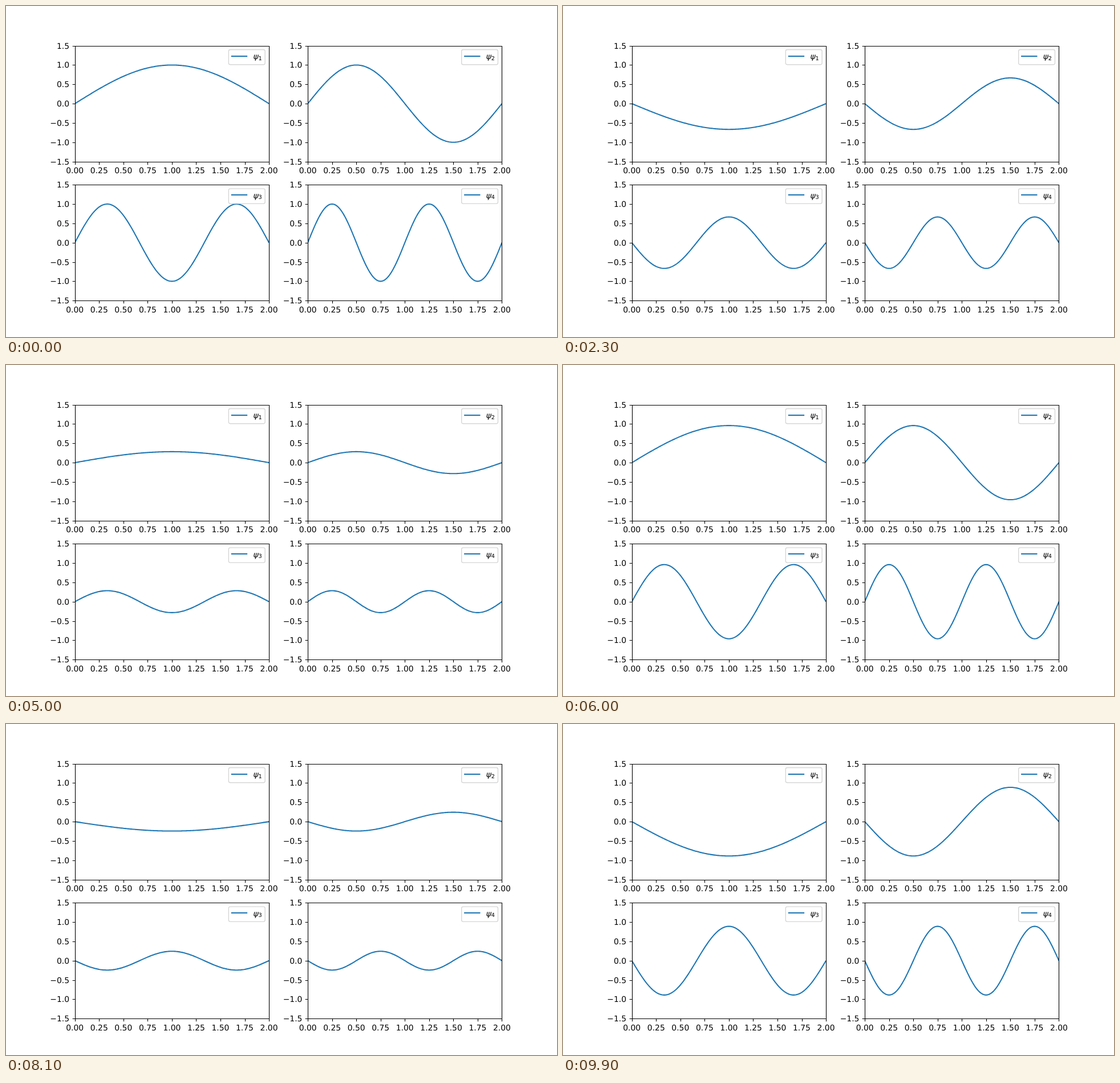
An HTML page that plays this animation: 966 by 580 pixels, repeating every 10000 ms.

```html
<!DOCTYPE html>
<html lang="en">
<head>
<meta charset="utf-8">
<title>Standing waves</title>
<style>
  html, body { margin: 0; width: 100%; height: 100%; overflow: hidden; background: #fff; }
  svg { display: block; }
  text { font: 13.89px "DejaVu Sans", sans-serif; text-rendering: geometricPrecision; }
  .mid { text-anchor: middle; }
  .end { text-anchor: end; }
  .psi { font-style: italic; }
  .sub { font-size: 9.72px; }
  .axis { fill: none; stroke: #000; stroke-width: 1.11; }
  .wave { fill: none; stroke: #1f77b4; stroke-width: 2.083; stroke-linejoin: round; }
  .box { fill: #fff; fill-opacity: .8; stroke: #ccc; stroke-opacity: .8; stroke-width: 1.39; }
</style>
</head>
<body>
<svg id="stage" width="966" height="580" viewBox="0 0 966 580"></svg>
<script>
const NS = "http://www.w3.org/2000/svg";
const stage = document.getElementById("stage");
const W = 340.295, H = 203;
const STEP = 100, STEPS = 100, POINTS = 200;
const snap = v => Math.round(v) + 0.5;

function add(parent, tag, attrs, text) {
  const el = document.createElementNS(NS, tag);
  for (const key in attrs) el.setAttribute(key, attrs[key]);
  if (text !== undefined) el.textContent = text;
  parent.appendChild(el);
  return el;
}

function makePanel(n) {
  const left = 120.75 + (n % 2 ? 0 : 408.35);
  const top = 69.6 + (n > 2 ? 243.6 : 0);
  const right = left + W, bottom = top + H;
  const x0 = snap(left), y0 = snap(top), x1 = snap(right), y1 = snap(bottom);

  const clip = add(stage, "clipPath", { id: "clip" + n });
  add(clip, "rect", { x: left, y: top, width: W, height: H });
  const wave = add(stage, "path", { class: "wave", "clip-path": `url(#clip${n})` });

  let axis = `M${x0} ${y0}H${x1}V${y1}H${x0}Z`;
  for (let i = 0; i <= 8; i++) {
    const x = left + W * i / 8;
    axis += `M${snap(x)} ${y1}v4.86`;
    add(stage, "text", { class: "mid", x, y: Math.round(bottom + 20.5) }, (i / 4).toFixed(2));
  }
  for (let i = 0; i <= 6; i++) {
    const y = top + H * i / 6, value = 1.5 - i / 2;
    axis += `M${x0} ${snap(y)}h-4.86`;
    add(stage, "text", { class: "end", x: left - 9.72, y: Math.round(y + 5) },
      value.toFixed(1).replace("-", "\u2212"));
  }
  add(stage, "path", { class: "axis", d: axis });

  add(stage, "rect", { class: "box", x: right - 70.7, y: top + 6.94, width: 63.8, height: 26.2, rx: 2.78 });
  add(stage, "path", { class: "wave", d: `M${right - 66.3} ${Math.floor(top + 18.4)}h28.4` });
  add(stage, "text", { class: "psi", x: right - 27.6, y: Math.round(top + 23.3) }, "\u03c8");
  add(stage, "text", { class: "sub", x: right - 18.6, y: Math.round(top + 25.2) }, n);

  return amp => {
    let d = "";
    for (let i = 0; i <= POINTS; i++) {
      const u = i / POINTS;
      const y = top + H / 2 - amp * Math.sin(n * Math.PI * u) * H / 3;
      d += (i ? "L" : "M") + (left + W * u).toFixed(2) + " " + y.toFixed(2);
    }
    wave.setAttribute("d", d);
  };
}

const panels = [1, 2, 3, 4].map(makePanel);
const start = performance.now();
let shown = -1;

function draw() {
  const step = Math.floor(Math.max(0, performance.now() - start) / STEP) % STEPS;
  if (step !== shown) {
    shown = step;
    panels.forEach(setAmp => setAmp(Math.cos(step / 10)));
  }
  requestAnimationFrame(draw);
}
draw();
</script>
</body>
</html>
```
